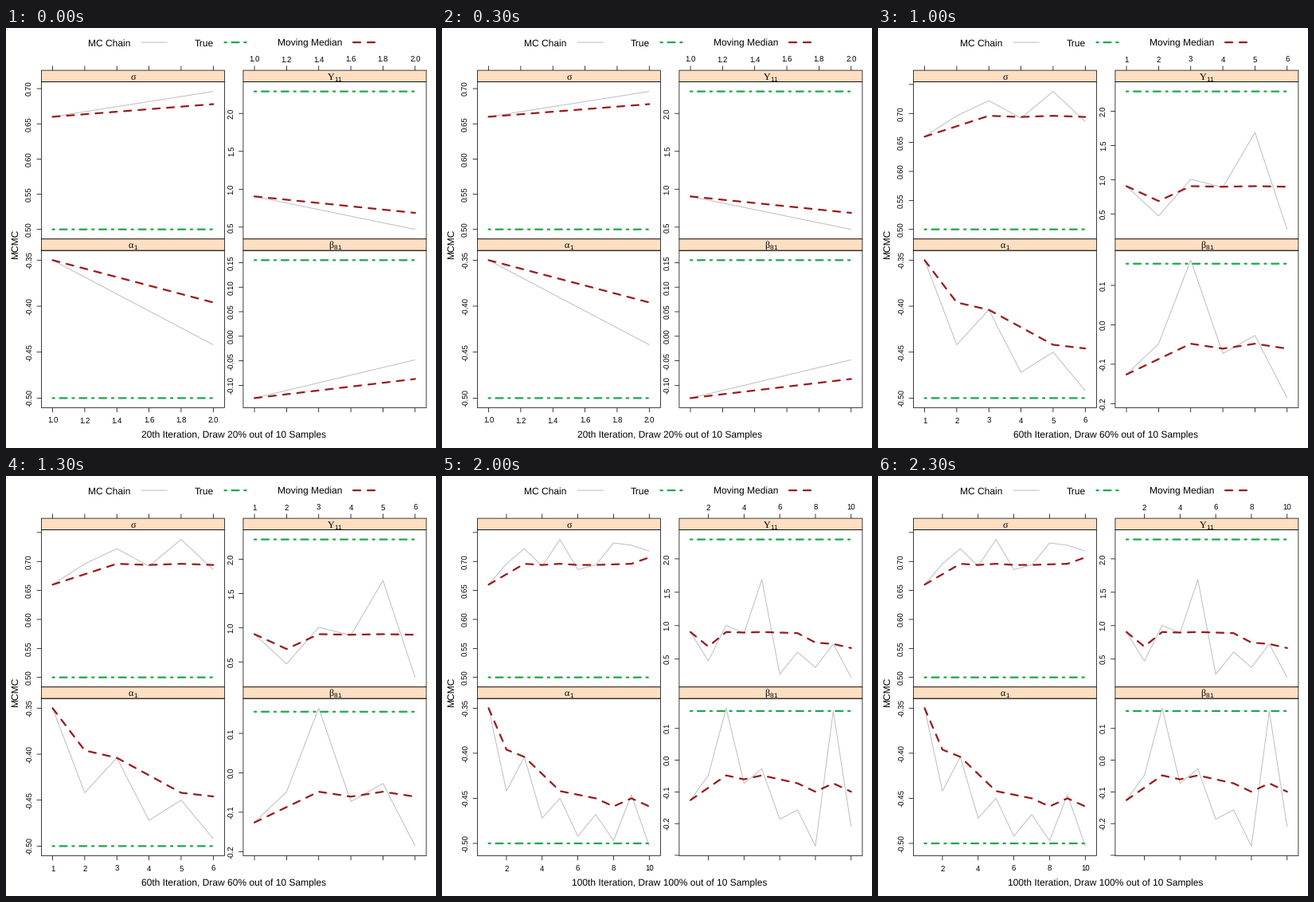
Write a matplotlib script that moves like this. It is 540 px wide and 527 px high and loops after 2.5 s.

```python
import math

import matplotlib.pyplot as plt
import numpy as np
from matplotlib.animation import FuncAnimation
from matplotlib.patches import Rectangle

W, H, DPI = 540, 527, 72  # one point equals one pixel
GREY, GREEN, RED, STRIP = "#bebebe", "#1fa74c", "#981b1e", "#ffdfc1"

# Two by two grid of panels, each under a strip with its name
LEFT, COL_STEP, PANEL_W = 44.4, 253.5, 230
BOTTOM, PANEL_H, STRIP_H = 476.5, 197.3, 14.4
PAD = 0.07  # axis room beyond the data on each side
TICK = 5.7

# name, subscript, true value, sampled chain; row by row
PANELS = [
    ("σ", "", 0.5,
     [0.66, 0.696, 0.722, 0.692, 0.738, 0.686, 0.694, 0.732, 0.728, 0.718]),
    ("Υ", "11", 2.29,
     [0.905, 0.47, 1.005, 0.888, 1.69, 0.273, 0.605, 0.375, 0.726, 0.226]),
    ("α", "1", -0.5,
     [-0.35, -0.442, -0.404, -0.472, -0.45, -0.492, -0.468, -0.497, -0.446, -0.503]),
    ("β", "81", 0.155,
     [-0.126, -0.048, 0.164, -0.073, -0.027, -0.186, -0.157, -0.271, 0.155, -0.21]),
]

plt.rcParams.update({
    "font.family": "Liberation Sans",
    "text.hinting": "none",
    "lines.scale_dashes": True,
})

fig = plt.figure(figsize=((W + 1e-3) / DPI, (H + 1e-3) / DPI), dpi=DPI, facecolor="white")
ax = fig.add_axes([0, 0, 1, 1])


def line(x, y, color="black", lw=0.75, dash=None):
    style = (0, dash) if dash else "-"
    ax.plot(x, y, color=color, lw=lw, ls=style, dash_capstyle="round",
            solid_capstyle="butt", solid_joinstyle="round", snap=False)


def chain_line(x, y):
    line(x, y, GREY, 1)


def true_line(x, y):
    line(x, y, GREEN, 2.25, (1, 3, 4, 3))


def median_line(x, y):
    line(x, y, RED, 2.25, (4, 4))


def box(x, y, w, h, fill="none"):
    ax.add_patch(Rectangle((x, y), w, h, fc=fill, ec="black", lw=0.75,
                           zorder=3, snap=False))


def text(x, y, s, size=12, ha="center", rotation=0, family="Liberation Sans"):
    ax.text(x, y, s, size=size, ha=ha, va="baseline", rotation=rotation,
            rotation_mode="anchor", family=family, color="black")


def limits(lo, hi):
    room = PAD * (hi - lo)
    return lo - room, hi + room


def tick_step(span):
    """Round step giving about five intervals."""
    cell = span / 5
    base = 10 ** math.floor(math.log10(cell))
    step = base
    for factor, bias in ((2, 1.5), (5, 2.75), (10, 1.5)):
        if factor * base - cell >= bias * (cell - step):
            break
        step = factor * base
    return step


def ticks(lo, hi):
    step = tick_step(hi - lo)
    digits = max(0, -math.floor(math.log10(step) + 1e-9))
    first, last = math.ceil(lo / step), math.floor(hi / step)
    return [(k * step, f"{k * step:.{digits}f}") for k in range(first, last + 1)]


def strip_label(mid, base, name, sub):
    symbol_w, digit_w = 7.5, 4.67
    x = mid - (symbol_w + digit_w * len(sub)) / 2
    text(x + symbol_w / 2, base, name, family="Liberation Serif")
    for k, digit in enumerate(sub):
        text(x + symbol_w + digit_w * k, base + 2, digit, 8.4, ha="left")


def draw_panel(n, index, name, sub, true, chain):
    row, col = divmod(index, 2)
    left = LEFT + COL_STEP * col
    bottom = BOTTOM - (1 - row) * (PANEL_H + STRIP_H)
    top = bottom - PANEL_H

    values = np.array(chain[:n])
    medians = np.array([np.median(values[:k]) for k in range(1, n + 1)])
    x_lo, x_hi = limits(1, n)
    y_lo, y_hi = limits(min(true, values.min()), max(true, values.max()))

    def px(v):
        return left + PANEL_W * (v - x_lo) / (x_hi - x_lo)

    def py(v):
        return bottom - PANEL_H * (v - y_lo) / (y_hi - y_lo)

    xs = px(np.arange(1, n + 1))
    chain_line(xs, py(values))
    true_line(xs[[0, -1]], [py(true)] * 2)
    median_line(xs, py(medians))

    box(left, top - STRIP_H, PANEL_W, STRIP_H, STRIP)
    box(left, top, PANEL_W, PANEL_H)
    strip_label(left + PANEL_W / 2, top - 3, name, sub)

    for v, label in ticks(y_lo, y_hi):
        y = py(v)
        line([left - TICK, left], [y, y])
        if min(y - top, bottom - y) > 4:  # no label right at a corner
            text(left - 11.4, y, label, 9.6, rotation=90)

    # Labels only above the right column and below the left one
    edge, out, base = (bottom, TICK, 495.5) if row else (top - STRIP_H, -TICK, 43)
    for v, label in ticks(x_lo, x_hi):
        x = px(v)
        line([x, x], [edge, edge + out])
        if row != col:
            text(x, base, label, 9.6)


def draw_legend():
    for x, label, draw in ((169.5, "MC Chain", chain_line),
                           (274.5, "True", true_line),
                           (436, "Moving Median", median_line)):
        text(x - 13.5, 23, label, ha="right")
        draw([x, x + 33.5], [18, 18])


def draw_frame(i):
    ax.clear()
    ax.set_axis_off()
    ax.set_xlim(0, W)
    ax.set_ylim(H, 0)
    n = 2 * (i + 1)
    draw_legend()
    for index, panel in enumerate(PANELS):
        draw_panel(n, index, *panel)
    text(14.5, 271.5, "MCMC", rotation=90)
    text(286, 515, f"{10 * n}th Iteration, Draw {10 * n}% out of 10 Samples")
    return ax.get_children()


anim = FuncAnimation(fig, draw_frame, frames=5, interval=500,
                     init_func=lambda: [], repeat=True, repeat_delay=0, blit=False)
plt.show()
```
